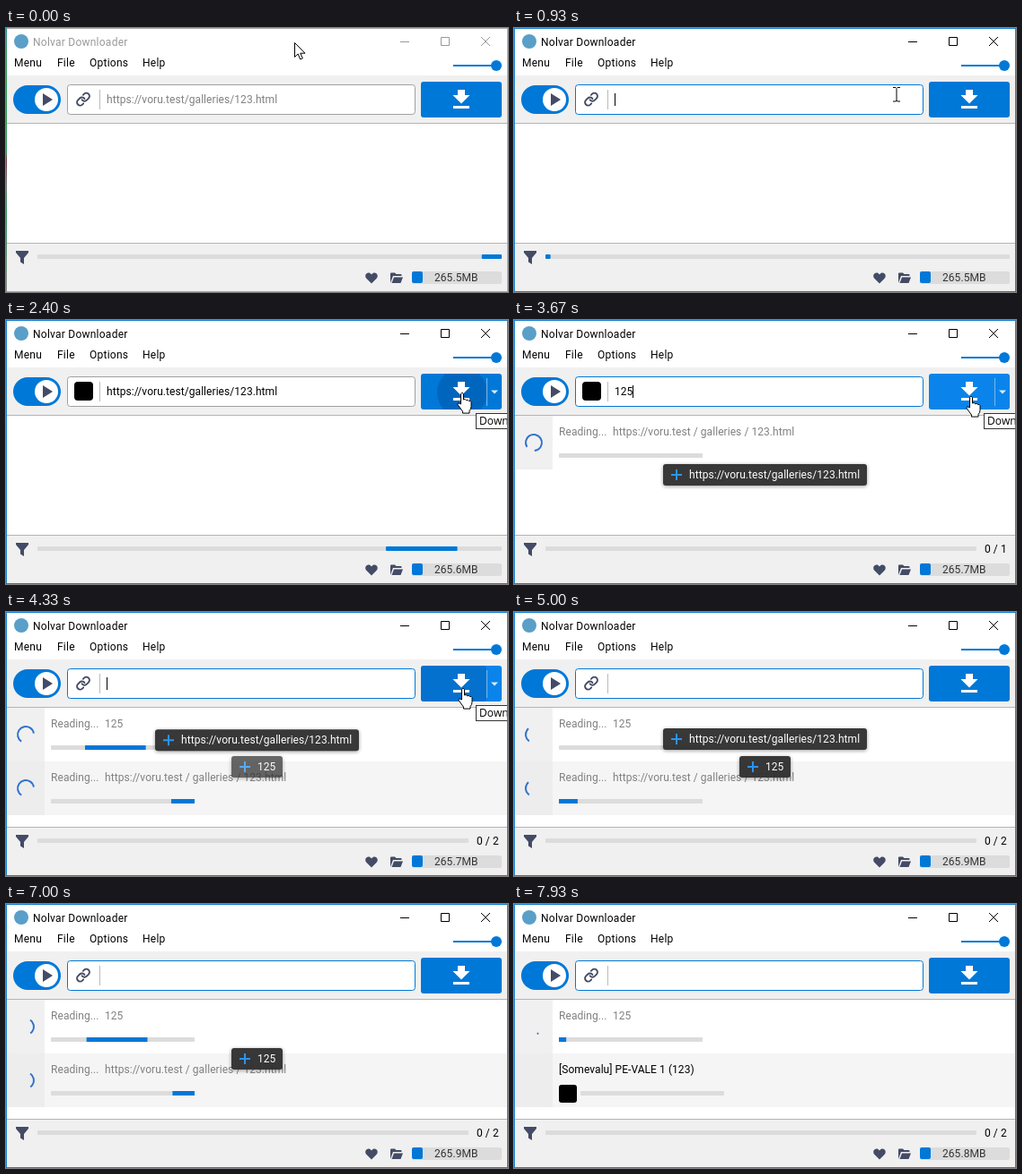
An HTML page that plays this animation: 559 px wide and 295 px high, repeating every 8000 ms.

```html
<!DOCTYPE html>
<html lang="en">
<head>
<meta charset="utf-8">
<style>
  html, body { margin: 0; width: 100%; height: 100%; overflow: hidden; background: #fff; }
  svg { display: block; font: 12px Roboto, sans-serif; letter-spacing: .06px; }
  text { white-space: pre; }
  .ui { letter-spacing: .24px; }
  .grey { fill: #808080; }
  .tip { font-family: "Open Sans", sans-serif; }
  .track { fill: #dcdcdc; }
  .blue { fill: #0078d7; }
  .ink { fill: #444b66; }
  .link { fill: none; stroke: #444b66; stroke-width: 2.7; stroke-linecap: round; }
  .spin { fill: none; stroke: #3272cd; stroke-width: 2; }
  .toast rect { fill: #303030; filter: drop-shadow(0 1px 2px #0006); }
  .toast path { stroke: #2490f0; stroke-width: 2; }
  .toast text { fill: #fff; }
</style>
</head>
<body>
<svg width="559" height="295" viewBox="0 0 559 295">
  <defs>
    <linearGradient id="edge" x2="0" y2="1">
      <stop offset="0" stop-color="#2a8f9c"/><stop offset=".1" stop-color="#2f9a58"/>
      <stop offset=".47" stop-color="#2f9a58"/><stop offset=".5" stop-color="#6b4048"/>
      <stop offset=".6" stop-color="#777"/><stop offset=".7" stop-color="#2f9a58"/>
      <stop offset="1" stop-color="#888"/>
    </linearGradient>
    <clipPath id="press"><rect x="462" y="60" width="73" height="40" rx="3"/></clipPath>
  </defs>

  <rect width="559" height="295" fill="#fff"/>
  <path d="M0 53h559v53H0zM0 241h559v54H0z" fill="#f0f0f0"/>
  <path d="M0 106.5h559M0 240.5h559" stroke="#b4b4b4"/>

  <circle cx="17" cy="15" r="8" fill="#5a9fc8"/>
  <text id="title" class="ui" x="30" y="20">Nolvar Downloader</text>
  <g id="chrome" fill="none">
    <path d="M439 15.5h10M484.5 10.5h9v9h-9zM529 10l10 10m0-10l-10 10"/>
  </g>
  <g class="ui">
    <text x="9" y="43">Menu</text><text x="57" y="43">File</text>
    <text x="93" y="43">Options</text><text x="152" y="43">Help</text>
  </g>
  <rect class="blue" x="498" y="41" width="48" height="2"/>
  <circle class="blue" cx="546" cy="42" r="6"/>

  <rect class="blue" x="8" y="64" width="53" height="32" rx="16"/>
  <circle cx="45" cy="80" r="13" fill="#fff"/>
  <path class="ink" d="M41 73v14l11-7z"/>

  <rect id="field" x="68.5" y="63.5" width="387" height="33" rx="3" fill="#fff"/>
  <g id="linkIcon" class="link" transform="translate(77.6 71.2) scale(.7)">
    <path d="M10 13a5 5 0 0 0 7.54.54l3-3a5 5 0 0 0-7.07-7.07l-1.72 1.71M14 11a5 5 0 0 0-7.54-.54l-3 3a5 5 0 0 0 7.07 7.07l1.71-1.71"/>
  </g>
  <rect id="siteIcon" x="76" y="69" width="21" height="21" rx="4"/>
  <path d="M104.5 69v22" stroke="#bbb"/>
  <text id="entry" x="112" y="84"></text>
  <rect id="caret" y="73" width="1" height="14"/>

  <rect id="button" x="462" y="60" width="90" height="40" rx="3"/>
  <g clip-path="url(#press)"><circle id="ripple" cx="508" cy="81" fill="#0060b4"/></g>
  <path d="M503 69h8v6h5.5l-9.5 9.500-9.500-9.500h5.500zM498 87h18v3h-18z" fill="#fff"/>
  <g id="split"><path d="M535.5 65v31" stroke="#78b8ec"/><path d="M540 78.500h8l-4 4z" fill="#d8ebfb"/></g>

  <g id="rows"></g>

  <path class="ink" d="M11 249h14v2l-5 6v7l-4-2.500v-4.500l-5-6z"/>
  <rect id="mainTrack" class="track" x="35" y="253" height="5" rx="1"/>
  <rect id="mainChunk" class="blue" y="253" height="5" rx="1"/>
  <text id="count" x="524" y="260"></text>
  <path class="ink" d="M407 285.500l-5.500-5.500c-4-4.500 2.500-9.500 5.500-4.500c3-5 9.500 0 5.500 4.500z"/>
  <path class="ink" d="M428 285v-10.500q0-1 1-1h4l1.500 1.500h5q1 0 1 1v1h-9.500zM429.500 285l2.500-6.500h10l-2.500 6.500z"/>
  <rect class="track" x="452" y="272" width="100" height="14" rx="2"/>
  <rect class="blue" x="452" y="272" width="12" height="13" rx="2"/>
  <text id="memory" x="477" y="283" fill="#333"></text>

  <g id="toastUrl" class="toast">
    <rect x="166" width="227" height="24" rx="3"/><path d="M175 12h12m-6-6v12"/>
    <text x="195" y="16">https://voru.test/galleries/123.html</text>
  </g>
  <g id="toastId" class="toast">
    <rect x="251" width="57" height="24" rx="3"/><path d="M260 12h12m-6-6v12"/>
    <text x="280" y="16">125</text>
  </g>

  <g id="tipField" class="tip">
    <rect x="432.500" y="96.500" width="104" height="18" fill="#fff" stroke="#333"/>
    <text x="437" y="110">URL or gallery id</text>
  </g>
  <g id="tipButton" class="tip">
    <rect x="523.500" y="104.500" width="68" height="17" fill="#fff" stroke="#333"/>
    <text x="527" y="117">Download</text>
  </g>

  <rect id="frame" x=".5" y=".5" width="558" height="294" fill="none"/>
  <rect id="strip" width="1" height="295" fill="url(#edge)"/>

  <g id="pointer" stroke="#000" stroke-width="1" fill="#fff">
    <path id="arrow" d="M.5.5v16l3.700-3.500 2.500 6 2.600-1.100-2.500-5.700h5.200z"/>
    <path id="beam" d="M-4 -7.500h3l1 1 1-1h3M0 -6v13M-4 8h3l1-1 1 1h3" fill="none"/>
    <path id="hand" d="M-1.500 13V1.500q1.500-2.500 3 0V8q2-1.500 3 .8 2-1.200 3 .8 2-.8 2.500 1v5q0 3-2 5v2.500h-7.500v-2l-5.500-7.500q0-3 3.500-.600z"/>
  </g>
</svg>
<script>
const LOOP = 8000, STEP = 200 / 3;
const URL_TEXT = 'https://voru.test/galleries/123.html';
const FOCUS = 730, PRESS = 2260, FIRST = 2500, SECOND = 4160, READY = 7400;

const $ = id => document.getElementById(id);
const set = (el, attrs) => { for (const k in attrs) el.setAttribute(k, attrs[k]); };
const show = (el, on) => el.style.display = on ? '' : 'none';
const clamp = x => Math.min(1, Math.max(0, x));
const ease = x => (1 - Math.cos(Math.PI * clamp(x))) / 2;
const latest = (table, t) => table.filter(row => row[0] <= t).pop();
const mod = (a, n) => ((a % n) + n) % n;

const entries = [[0, ''], [1400, URL_TEXT], [FIRST, ''], [3000, '1'], [3250, '12'], [3500, '125'], [SECOND, '']];
const memory = [[0, 5], [1200, 6], [3100, 7], [4700, 9], [5700, 8], [6500, 9], [7300, 8]];
const path = [[0, 321, 16], [130, 321, 16], [670, 426, 74], [1860, 426, 74], [2180, 508, 81],
  [2500, 508, 81], [2800, 509, 85], [4400, 509, 85], [4660, 575, 92], [LOOP, 575, 92]];

function pointerAt(t) {
  const i = path.findIndex(p => p[0] > t);
  const [a, b] = [path[i - 1], path[i]];
  const k = ease((t - a[0]) / (b[0] - a[0]));
  return [a[1] + (b[1] - a[1]) * k, a[2] + (b[2] - a[2]) * k];
}

// A busy chunk: the tail follows the head with the same easing, then a pause.
function sweep(el, x, width, t, { start, time, lag, cycle }) {
  const u = mod(t - start, cycle) / time;
  const head = ease(u), tail = ease(u - lag);
  set(el, { x: x + width * tail, width: width * (head - tail) });
}

function makeRow() {
  const g = document.createElementNS('http://www.w3.org/2000/svg', 'g');
  g.innerHTML = `<rect class="back" x="1" width="557" height="60"/>
    <rect class="side" x="1" width="42" height="60" fill="#f0f0f0"/>
    <circle class="spin" cx="22" cy="30" r="9" pathLength="360"/>
    <text class="state grey" x="50" y="22">Reading...</text><text class="name grey" x="110" y="22"></text>
    <rect class="thumb" x="50" y="35" width="20" height="20" rx="3"/>
    <rect class="track" y="42" width="160" height="5" rx="1"/>
    <rect class="blue" y="42" height="5"/>`;
  $('rows').append(g);
  return g;
}

const urlRow = makeRow(), idRow = makeRow();

function drawRow(row, t, { y, name, start, done }) {
  const part = s => row.querySelector(s);
  set(row, { transform: `translate(0 ${y})` });
  set(part('.back'), { fill: y > 107 ? '#f5f5f5' : '#fff' });
  set(part('.side'), { fill: y > 107 ? '#ededed' : '#f0f0f0' });
  for (const s of ['.spin', '.state', '.blue']) show(part(s), !done);
  show(part('.thumb'), done);
  const label = part('.name');
  label.textContent = name;
  set(label, { x: done ? 50 : 110, class: done ? 'name' : 'name grey' });
  set(part('.track'), { x: done ? 74 : 50 });
  sweep(part('.blue'), 50, 160, t, { start, time: 850, lag: .28, cycle: 1330 });

  const left = 7933 - t;
  const span = Math.max(12, 300 * Math.sin(Math.PI * left / 772) ** 2);
  set(part('.spin'), {
    'stroke-dasharray': `${span} ${360 - span}`,
    transform: `rotate(${60 - .451 * left - span / 2} 22 30)`
  });
}

function drawToast(el, t, from, to, y) {
  el.style.opacity = .96 * Math.min(clamp((t - from) / 200), clamp((to - t) / 200));
  set(el, { transform: `translate(0 ${y})` });
}

function render(t) {
  const active = t >= FOCUS, focused = active && !(t >= PRESS && t < FIRST);
  const [x, y] = pointerAt(t);
  const hover = x >= 462 && x < 552 && y > 60;
  const overField = x < 456 && y > 63;

  set($('title'), { fill: active ? '#000' : '#999' });
  set($('chrome'), { stroke: active ? '#000' : '#999' });
  set($('frame'), { stroke: active ? '#1883d7' : '#aaa' });
  show($('strip'), !active);

  const [changed, value] = latest(entries, t);
  const entry = $('entry');
  entry.textContent = value || (active ? '' : URL_TEXT);
  set(entry, { fill: value ? '#000' : '#808080' });
  set($('field'), { stroke: focused ? '#0078d7' : '#a0a0a0' });
  show($('linkIcon'), !value);
  show($('siteIcon'), value);
  set($('caret'), { x: Math.round(112 + (value ? entry.getComputedTextLength() : 0)) });
  show($('caret'), focused && Math.floor((t - Math.max(changed, FOCUS)) / 530) % 2 === 0);

  set($('button'), { fill: hover && t >= FIRST ? '#0a84ea' : '#0078d7' });
  show($('split'), hover);
  const since = t - (t >= SECOND ? SECOND - 100 : PRESS);
  set($('ripple'), { r: Math.max(0, 28 * Math.min(2, since / 140)), opacity: .75 * clamp((440 - since) / 240) });

  const total = t >= SECOND ? 2 : t >= FIRST ? 1 : 0;
  show(urlRow, total > 0);
  show(idRow, total > 1);
  const done = t >= READY;
  drawRow(urlRow, t, {
    y: total > 1 ? 167 : 107, done, start: total > 1 ? 3470 : FIRST,
    name: done ? '[Somevalu] PE-VALE 1 (123)' : 'https://voru.test / galleries / 123.html'
  });
  drawRow(idRow, t, { y: 107, name: '125', start: 3820, done: false });

  set($('mainTrack'), { width: total ? 480 : 517 });
  show($('mainChunk'), !total);
  sweep($('mainChunk'), 35, 517, t, { start: 800, time: 2000, lag: .133, cycle: 2800 });
  $('count').textContent = total ? `0 / ${total}` : '';
  $('memory').textContent = `265.${latest(memory, t)[1]}MB`;

  drawToast($('toastUrl'), t, 2520, 5600, 161 - 31 * ease((t - SECOND) / 200));
  drawToast($('toastId'), t, 4180, 7250, 161);

  show($('tipField'), t >= 1790 && overField);
  show($('tipButton'), t >= 2330 && hover);
  set($('pointer'), { transform: `translate(${Math.round(x)} ${Math.round(y)})` });
  show($('arrow'), !hover && !overField);
  show($('beam'), overField);
  show($('hand'), hover);
}

const began = performance.now();
function tick() {
  const t = (performance.now() - began) % LOOP;
  render(Math.min(119, Math.floor((t + 4) / STEP)) * STEP);
  requestAnimationFrame(tick);
}
tick();
</script>
</body>
</html>
```
